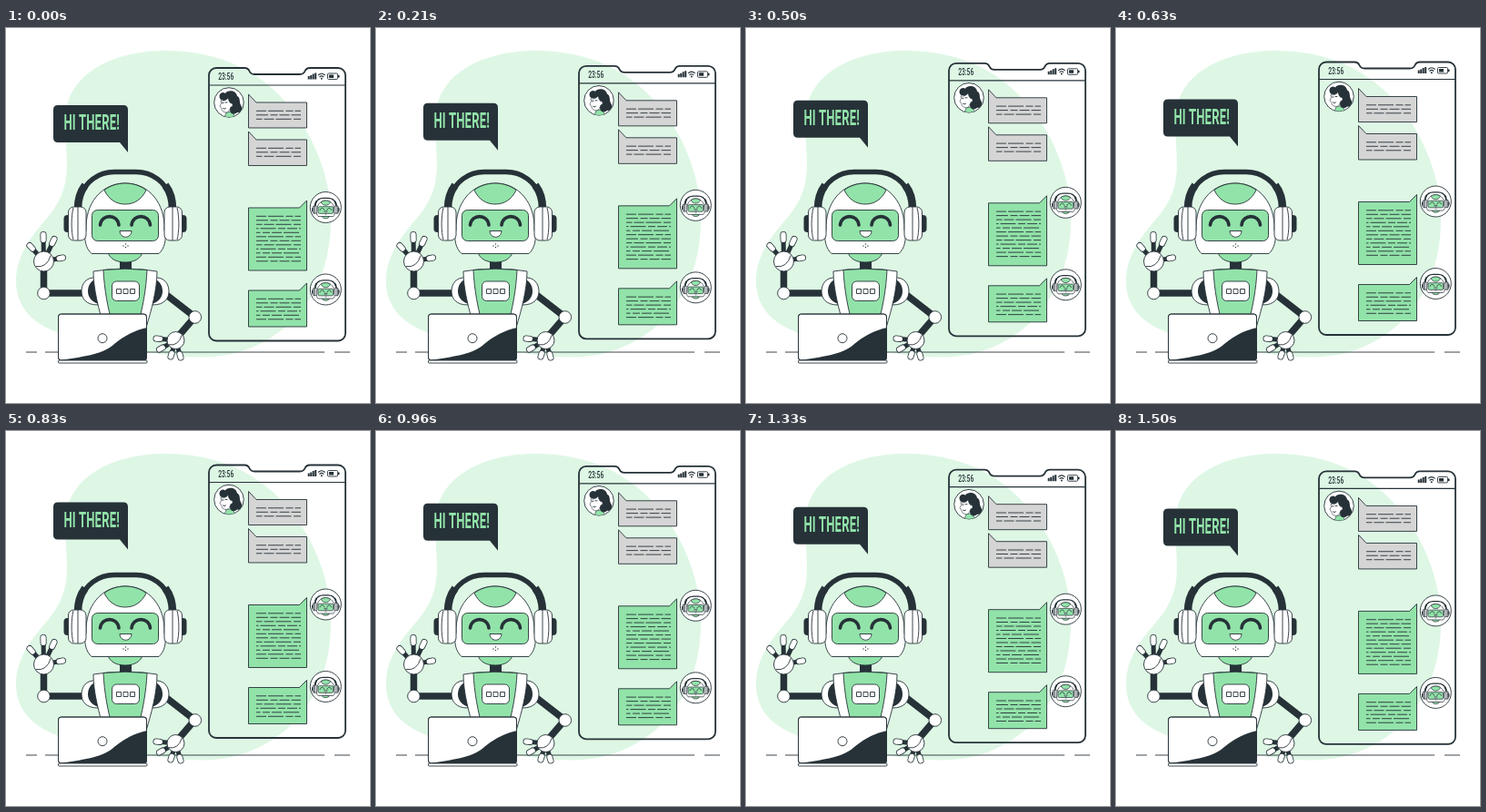
Write an HTML page that moves like this. It is 400x413 px and loops after 1.54 s.

```html
<!DOCTYPE html>
<html lang="en">
<head>
<meta charset="utf-8">
<title>Hi there</title>
<style>
  html, body { margin: 0; width: 100%; height: 100%; overflow: hidden; background: #fff; }
  svg { display: block; width: 100%; height: 100%; }
  .d { fill: #263238; stroke: none; }
  .w { fill: #fff; }
  .g { fill: #92e3a9; }
  .s { fill: #d5d5d5; }
  .l { fill: none; }
  .r { stroke-linecap: round; }
  text { font-family: Roboto, "Liberation Sans", sans-serif; text-anchor: middle; stroke: none; }
</style>
</head>
<body>
<svg viewBox="0 0 400 413" stroke="#263238" stroke-width=".9" stroke-linejoin="round">
  <defs>
    <g id="head">
      <path class="l" stroke-width="5.6" d="M82 185C87 170 101 158.500 119 158.500H143C161 158.500 175 170 180 185"/>
      <path class="l" stroke-width="8.500" d="M87 173C81 181 79 189 79 199M175 173C181 181 183 189 183 199"/>
      <path class="g" d="M112 247C114 254 121 258 131 258S148 254 150 247Z"/>
      <path class="w" d="M88 222C87 194 104 171 131 171S175 194 174 222C177 233 174 243 168 248.500H94C88 243 85 233 88 222Z"/>
      <path class="g" d="M108 178.500C121 168.500 141 168.500 154 178.500C149 189 141 194 131 194S113 189 108 178.500Z"/>
      <rect class="g" x="94.500" y="200.500" width="73" height="34" rx="6"/>
      <path class="l r" stroke-width="3.600" d="M103.500 217C105 204.500 122.500 204.500 124 217M138 217C139.500 204.500 157 204.500 158.500 217"/>
      <path class="w" d="M125 223.500H138C137.500 232.500 125.500 232.500 125 223.500Z"/>
      <path class="l r" stroke-width="1.300" d="M131.500 238v0M129 240v0M134 240v0M131.500 241.500v0"/>
      <g id="cup">
        <rect class="d" x="63.500" y="206" width="9" height="19" rx="4"/>
        <rect class="w" x="68.500" y="197" width="19.500" height="37" rx="6"/>
        <path class="l" d="M74 198C71.500 207 71.500 225 74 233M79 197V234"/>
      </g>
      <use href="#cup" transform="matrix(-1 0 0 1 262 0)"/>
    </g>
    <clipPath id="face"><circle r="16"/></clipPath>
    <clipPath id="lid"><rect x="57.500" y="315" width="97" height="51" rx="3"/></clipPath>
  </defs>

  <path fill="#def7e5" stroke="none" d="M65.500 96C69 48 121 25 175 25C237 25 278 49 306 80C337 115 357 162 357 211C357 258 341 297 311 326C286 348 255 362.500 215 362.500C167 362.500 119 349 74 340C35 332 11 311 11 279C11 248 31 226 47 207C78 169 63 138 65.500 96Z"/>
  <path class="l" d="M22 357H34M43 357H58M155 357H350M361 357H378"/>

  <g id="float">
    <path class="l" stroke-width="1.800" d="M231 44H262C270 44 265 51 273 51H323C331 51 326 44 334 44H365A8 8 0 0 1 373 52V336.500A8 8 0 0 1 365 344.500H231A8 8 0 0 1 223 336.500V52A8 8 0 0 1 231 44Z"/>
    <path class="l" stroke-width="1.200" d="M223 63H373"/>
    <text class="d" transform="translate(241.700 57.300) scale(.67 1)" font-size="10" font-weight="500">23:56</text>
    <path class="l" stroke-width="2" d="M332.700 56.500v-3.500M335.200 56.500v-4.500M337.700 56.500v-6M340.200 56.500v-7"/>
    <path class="l" stroke-width="1.100" d="M343 52Q346.800 48.500 350.600 52M344.500 54Q346.800 51.800 349.100 54"/>
    <circle class="d" cx="346.800" cy="55.700" r="1"/>
    <rect class="l" x="353.500" y="50" width="11" height="6.500" rx="1"/>
    <path class="d" d="M355 51.500h5v3.500h-5zM365 52h1.500v2.500H365z"/>

    <g transform="translate(245 82)">
      <circle class="w" r="16.300"/>
      <g clip-path="url(#face)">
        <path class="g" stroke-width=".6" d="M-5 17L-3 11L4 10L7 17Z"/>
        <path class="d" d="M-9-3C-13-8-8-13-4-10C-2-14 8-14 9-7C13-5 11-1 13 3C16 7 14 12 9 11C6 14 1 13 1 8L-2-1Z"/>
        <path class="w" stroke-width=".6" d="M-9-2C-6-1-2-3-1-5C0-1 1 1 3 1C5 2 4 5 2 5C1 8 0 10-2 11C-5 11-8 10-8 7L-10 4L-8.500 1Z"/>
        <path class="l r" stroke-width=".9" d="M-7.500.5h1.500M-4 0h2M-6.500 6.500Q-5 8-3.500 6.500"/>
      </g>
    </g>
    <g id="chat"></g>

    <path class="d" d="M57 85H129Q134 85 134 90V137L125 126H57Q52 126 52 121V90Q52 85 57 85Z"/>
    <text transform="translate(94.200 112.300) scale(.57 1)" font-size="23" font-weight="700" style="fill:#92e3a9;letter-spacing:.3px">HI THERE!</text>
  </g>

  <g id="robot">
    <path class="l" stroke-width="7.500" d="M46 292H88M41.500 264V290M170 289L206 317M206 320L188 341"/>
    <path class="d" d="M125 255h13v12h-13z"/>
    <path class="w" d="M99 275C88 274 83 282 83 290S88 305 101 305ZM163 275C174 274 179 282 179 290S174 305 161 305Z"/>
    <path class="d" d="M99 277C93 278 90 284 90 290S94 302 102 304ZM163 277C169 278 172 284 172 290S168 302 160 304Z"/>
    <path class="w" d="M96 268Q131 262 166 268C166 288 160 310 154 330H108C102 310 96 288 96 268Z"/>
    <path class="g" d="M107 266.500Q131 264 155 266.500C154 288 150 310 144 330H118C112 310 108 288 107 266.500Z"/>
    <rect class="w" x="116.500" y="279" width="30" height="21.500" rx="5"/>
    <path class="w" d="M121.500 287.500h5v5h-5zM129 287.500h5v5h-5zM136.500 287.500h5v5h-5z"/>
    <circle class="w" cx="41.500" cy="292" r="6.800"/>
    <circle class="w" cx="207.800" cy="318.500" r="6.800"/>
    <g id="hands"></g>
    <use href="#head"/>
  </g>

  <rect class="w" x="57.500" y="315" width="97" height="51" rx="3"/>
  <path class="d" clip-path="url(#lid)" d="M60 366C90 361 107 359 119 348C130 339 141 333 155 330V366Z"/>
  <rect class="l" x="57.500" y="315" width="97" height="51" rx="3"/>
  <circle class="w" cx="106" cy="341.700" r="5"/>
  <rect class="w" x="57.500" y="366" width="97.500" height="3" rx="1"/>
</svg>
<script>
const LOOP = 1540, STEPS = 37, STEP_MS = 1000 / 24, RISE = 8, ROW = 4.5;
const $ = id => document.getElementById(id);

// Message bubble with rows of dashed "writing"; the tail sits on the sender's side.
function bubble(top, bottom, rows, fill, mine) {
  const shape = mine
    ? `M266.500 ${top}H322.500L330.500 ${top - 8}V${bottom}H266.500Z`
    : `M266.500 ${top - 9}L275 ${top}H330.500V${bottom}H266.500Z`;
  let out = `<path class="${fill}" d="${shape}"/>`;
  for (let i = 0; i < rows; i++) {
    const y = top + 9.3 + i * ROW;
    out += `<path class="l" stroke-dasharray="11 2 17 2.500 8 2" stroke-dashoffset="${i * 17}" d="M275 ${y}H324"/>`;
  }
  return out;
}

function robotAvatar(y) {
  return `<g transform="translate(351.300 ${y})"><circle class="w" r="17"/>
    <g clip-path="url(#face)" stroke-width="3.200">
      <use href="#head" transform="scale(.225) translate(-131 -204)"/>
    </g></g>`;
}

// Palm with jointed fingers: dark link, then a white tip capsule.
function hand(cx, cy, r, tips) {
  const at = (x, y, k) => `${cx + (x - cx) * k} ${cy + (y - cy) * k}`;
  const fingers = tips.map(([x, y]) => {
    const tip = `M${at(x, y, .8)}L${x} ${y}`;
    return `<path class="l" stroke-width="5" d="M${cx} ${cy}L${x} ${y}"/>
      <path class="l r" stroke-width="7" d="${tip}"/>
      <path class="l r" stroke="#fff" stroke-width="5.400" d="${tip}"/>`;
  }).join('');
  return `${fingers}<circle class="w" cx="${cx}" cy="${cy}" r="${r}"/>
    <path class="l" d="M${cx - r * .8} ${cy + r * .5}Q${cx + r * .3} ${cy + r * .7} ${cx + r * .7} ${cy - r * .6}"/>`;
}

$('chat').innerHTML =
  bubble(82, 110, 3, 's') + bubble(123, 151.5, 3, 's') +
  bubble(198, 267, 12, 'g', true) + bubble(289, 329, 6, 'g', true) +
  robotAvatar(197.5) + robotAvatar(288);

$('hands').innerHTML =
  hand(41.5, 257, 11, [[26, 239.5], [41, 227.5], [53, 232.5], [62.5, 253]]) +
  hand(186.5, 344, 9.5, [[165, 342], [168.5, 354], [181, 362], [192, 363]]);

// Linear rise and fall, stepped at 24 per second.
function draw(now) {
  const step = Math.floor((now % LOOP + 5) / STEP_MS) % STEPS;
  const phase = (step + 1) / STEPS % 1;
  const lift = RISE * (1 - Math.abs(1 - 2 * phase));
  $('float').setAttribute('transform', `translate(0 ${(0.43 - lift).toFixed(3)})`);
}

const start = performance.now();
function tick() {
  draw(performance.now() - start);
  requestAnimationFrame(tick);
}
tick();
</script>
</body>
</html>
```
